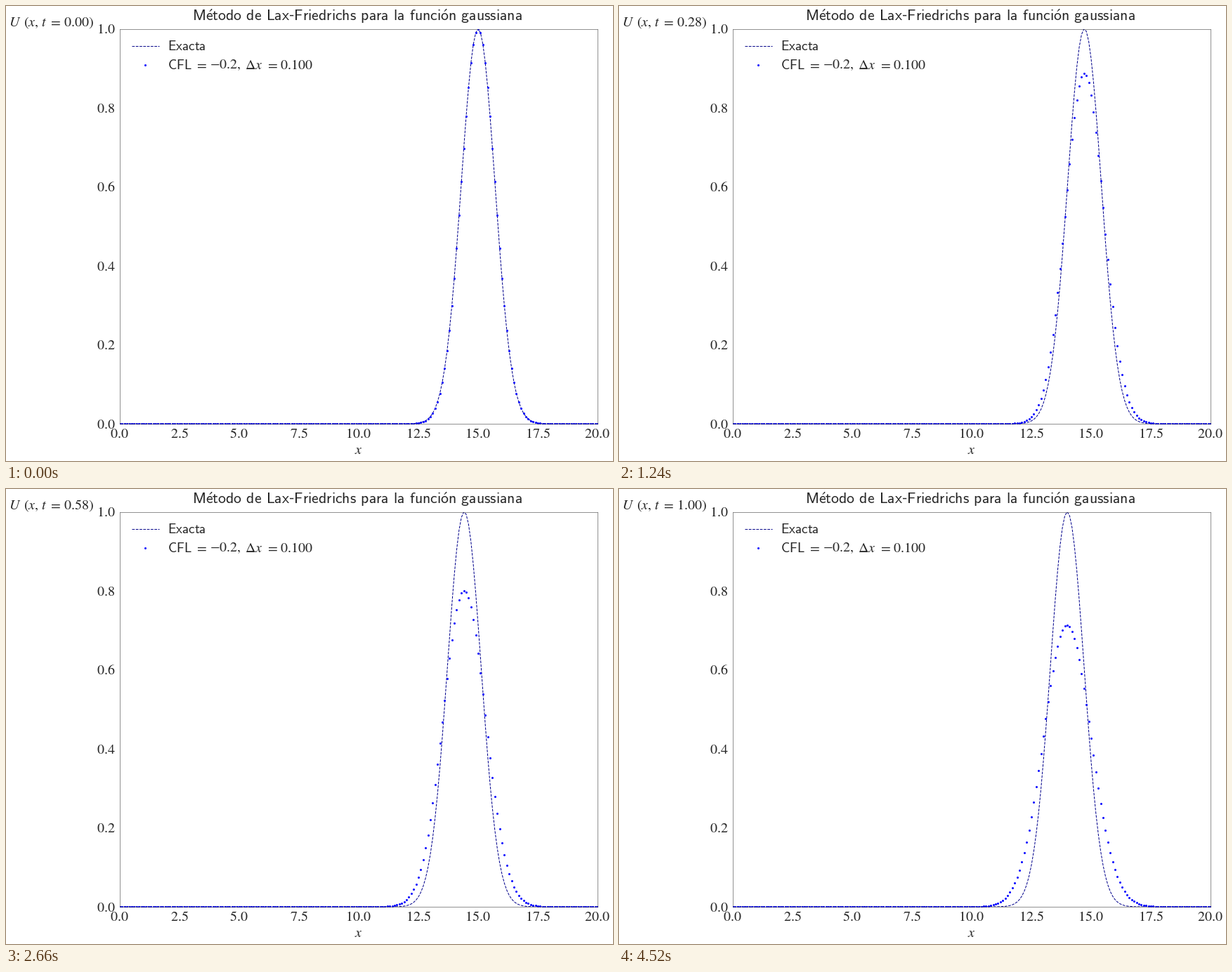
A matplotlib script for the animation above (4620 ms loop, 864 px wide and 648 px high).

```python
import numpy as np
import matplotlib.pyplot as plt
from matplotlib.animation import FuncAnimation
from matplotlib.lines import Line2D

W, H, DPI = 864, 648, 72
INK, NAVY, BLUE = "#262626", "#00008b", "#0000ff"
LEFT, RIGHT, TOP, BOTTOM = 162, 842, 32.5, 595

DX, CFL, STEPS = 0.1, -0.2, 50
DT = abs(CFL) * DX
TICK = 20       # ms
LOOP = 4620     # ms

x = np.linspace(0, 20, 201)


def exact(t):
    return np.exp(-(x - 15 + t) ** 2)


def lax_friedrichs(u):
    new = u.copy()
    new[1:-1] = (0.5 * (u[2:] + u[:-2])
                 - 0.5 * CFL * (u[2:] - u[:-2]))
    return new


states = [exact(0)]
for _ in range(STEPS):
    states.append(lax_friedrichs(states[-1]))

# Every step lasts 100 ms, except one short step of 20 ms in each nine.
k = np.arange(STEPS + 1)
starts = 100 * k - 80 * np.round(k / 9).astype(int)

fig = plt.figure(figsize=(W / DPI, H / DPI), dpi=DPI, facecolor="white")
ax = fig.add_axes([LEFT / W, 1 - BOTTOM / H,
                   (RIGHT - LEFT) / W, (BOTTOM - TOP) / H])
ax.set(xlim=(0, 20), ylim=(0, 1), xticks=[], yticks=[])
for spine in ax.spines.values():
    spine.set(linewidth=0.5, color=INK)


def put(px, py, text, size=20, ha="left", math="stix"):
    return fig.text(px / W, 1 - py / H, text, fontsize=size, ha=ha,
                    va="baseline", color=INK, family="Liberation Sans",
                    math_fontfamily=math)


def sans(px, py, words, size, ha="left"):
    text = r"$\hspace{0.38}$".join(words)
    return put(px, py, text, size, ha, "cm")


def sf(word):
    return r"$\mathsf{%s}$" % word


def legend_line(xs, y, **style):
    fig.add_artist(Line2D([v / W for v in xs], [1 - y / H] * len(xs), **style))


# Tick labels
for i in range(9):
    put(LEFT - 0.5 + 85 * i, 615.3, f"${2.5 * i:.1f}$", ha="center")
for i in range(6):
    put(155.3, BOTTOM + 6.6 - 112.5 * i, f"${0.2 * i:.1f}$", ha="right")
put(502, 638, "$x$", ha="center")

# Title
sans(500.3, 21, [sf(r"M\acute{e}todo"), sf("de"),
                 sf("Lax") + "-" + sf("Friedrichs"), sf("para"), sf("la"),
                 sf(r"funci\acute{o}n"), sf("gaussiana")], 21.8, "center")

# Label with the running time
put(4.5, 28.8, "$U$")
put(25, 28.8, "$(x,$")
put(50, 28.8, "$t$")
put(69.5, 28.8, "$=$", ha="center")
clock = put(82.3, 28.8, "$0.00)$")

# Legend
dash = dict(color=NAVY, lw=1, ls="--")
dots = dict(color=BLUE, ls="none", marker="o", ms=3, mew=0)
legend_line([179, 218], 56.5, **dash)
legend_line([198.3], 83.8, **dots)
sans(229.5, 63, [sf("Exacta")], 19.2)
sans(230.3, 89.5, [sf("CFL")], 19.2)
put(277.5, 89.5, "$=$", ha="center")
put(290.3, 89.5, "$-0.2,$")
put(340, 89.5, r"$\Delta x$")
put(378.5, 89.5, "$=$", ha="center")
put(390.5, 89.5, "$0.100$")

curve, = ax.plot(x, exact(0), **dash)
points, = ax.plot(x, states[0], **dots)


def update(i):
    n = np.searchsorted(starts, i * TICK, side="right") - 1
    t = n * DT
    curve.set_ydata(exact(t))
    points.set_ydata(states[n])
    clock.set_text(f"${t:.2f})$")
    return curve, points, clock


anim = FuncAnimation(fig, update, frames=LOOP // TICK, interval=TICK,
                     repeat=True, repeat_delay=0, blit=False)
plt.show()
```
